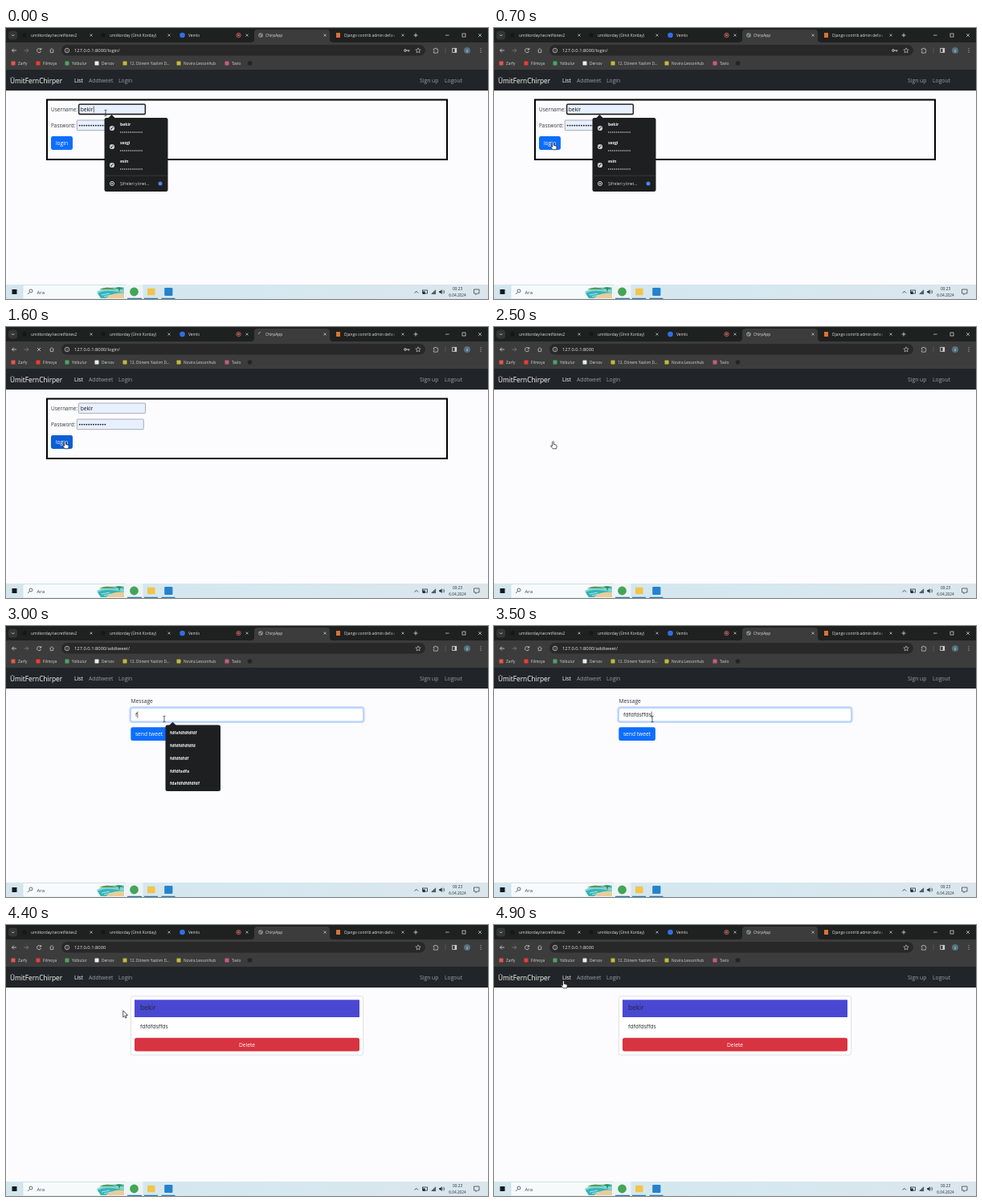
Recreate the animation shown at these times as an HTML page. Size 600 by 338 pixels, loop 5 s.

```html
<!DOCTYPE html>
<html lang="tr">
<head>
<meta charset="utf-8">
<title>ChirpApp</title>
<style>
html, body { margin: 0; width: 100%; height: 100%; overflow: hidden; background: #fcfbfd; }
svg { display: block; width: 100%; height: 100%; font-family: "Open Sans", "Noto Sans", sans-serif; }
</style>
</head>
<body>
<svg id="stage" viewBox="0 0 600 338" preserveAspectRatio="none"></svg>
<script>
const LOOP = 5000, STEP = 100;
const USER = 'bekir', MESSAGE = 'fdfdfdsffds';
const HISTORY = ['fdfafdfdfdfdf', 'fdfdfdfdfdfd', 'fdfdfdfdf', 'fdfdfadfa', 'fdafdfdfdfdfdf'];

// Drawing helpers return SVG markup.
const rect = (x, y, w, h, fill, more = '') =>
  `<rect x="${x}" y="${y}" width="${w}" height="${h}" fill="${fill}" ${more}/>`;
const dot = (x, y, r, fill, more = '') =>
  `<circle cx="${x}" cy="${y}" r="${r}" fill="${fill}" ${more}/>`;
const text = (x, y, str, size, fill, more = '') =>
  `<text x="${x}" y="${y}" font-size="${size}" fill="${fill}" ${more}>${str}</text>`;
const line = (d, color, width = 0.8, more = '') =>
  `<path d="${d}" fill="none" stroke="${color}" stroke-width="${width}" ${more}/>`;
const shape = (d, fill, more = '') => `<path d="${d}" fill="${fill}" ${more}/>`;
const group = (id, ...parts) => `<g id="${id}">${parts.join('')}</g>`;
const cross = (x, y, r, color, w = 0.8) =>
  line(`M${x - r} ${y - r}l${2 * r} ${2 * r}m0 ${-2 * r}l${-2 * r} ${2 * r}`, color, w);
const bullets = (x, y, gap, r, fill) =>
  Array.from({ length: 12 }, (_, i) => dot(x + i * gap, y, r, fill)).join('');
const globe = (x, y, r, color) =>
  dot(x, y, r, color) +
  shape(`M${x - r * 0.7} ${y - r * 0.2}l${r * 0.8} ${r * 0.3}l${-r * 0.3} ${r * 0.6}zM${x + r * 0.1} ${y - r * 0.7}l${r * 0.6} ${r * 0.5}l${-r * 0.5} ${r * 0.2}z`, '#333');

function tabStrip() {
  const ink = '#dfe1e3';
  const tabs = [
    [31, 'umitkorday/secretNotes2', 106],
    [129, 'umitkorday (Ümit Korday)', 203],
    [227, 'Vemlo', 300],
    [323, 'ChirpApp', 397],
    [421, 'Django contrib admin defau', 494]
  ];
  return rect(0, 0, 600, 19, '#1f2020') +
    shape('M305 18Q309 18 309 14V6Q309 2 313 2H399Q403 2 403 6V14Q403 18 407 18Z', '#3c3c3c') +
    rect(3, 3.5, 11, 11, '#343535', 'rx="3.5"') +
    line('M7 8.3l1.7 1.7l1.7-1.7', ink) +
    dot(23, 9, 2.7, '#151718') + dot(121, 9, 2.7, '#151718') + dot(219.5, 9, 3.3, '#2f6fe8') +
    rect(411, 6, 5, 6, '#d9742f') +
    tabs.map(([x, s, close]) => text(x, 10.9, s, 4.85, ink) + cross(close, 9, 1.5, '#d0d2d4', 0.7)).join('') +
    rect(476, 3, 12, 12, 'url(#fade)') +
    dot(289.5, 9, 2.7, 'none', 'stroke="#c9877f" stroke-width=".7"') + dot(289.5, 9, 1.4, '#e2574c') +
    line('M507.5 9h5m-2.5-2.5v5', ink) +
    line('M547 9h4.5', ink, 0.7) +
    rect(568, 7, 4, 4, 'none', `stroke="${ink}" stroke-width=".7"`) + cross(590, 9, 2, ink, 0.7);
}

function toolbar() {
  const ink = '#d3d5d7';
  const marks = [
    [9, '#e2574c', 15, 'Zarfy'],
    [40, '#f03a32', 46, 'Filmoya'],
    [76, '#4aa563', 82, 'Yolbulur'],
    [113, '#e9eef2', 119, 'Dersov'],
    [148, '#c3b93a', 154, '12. Dönem Yazılım D...'],
    [215, '#c3b93a', 221, 'Novira Lessonhub'],
    [275, '#c75a86', 281, 'Tavlo']
  ];
  return rect(0, 18, 600, 34.3, '#3c3c3c') +
    rect(69, 21, 453, 13.5, '#282828', 'rx="6.7"') +
    line('M13 28H7.5m2.4-2.4L7.5 28l2.4 2.4', ink) +
    line('M22.5 28H28m-2.4-2.4L28 28l-2.4 2.4', '#7c7e80') +
    line('M54.5 28l2.5-2.4l2.5 2.4m-4.2-.6v3.2h3.4v-3.2', ink, 0.7) +
    dot(76, 28, 2.8, 'none', `stroke="${ink}" stroke-width=".7"`) +
    line('M76 27.6v2m0-3.4v.8', ink, 0.7) +
    group('reload', line('M43.4 26.8A2.6 2.6 0 1 0 43.6 29M43.7 25v2.1h-2.2', ink)) +
    group('stop', cross(41, 28, 2, ink)) +
    group('savedKey', dot(497, 28, 1.3, 'none', `stroke="${ink}" stroke-width=".9"`) +
      line('M498.3 28h4.2m-1.2 0v1.6', ink, 0.9)) +
    shape('M513 24.8l.9 2.1l2.3.2l-1.8 1.5l.6 2.3l-2-1.2l-2 1.2l.6-2.3l-1.8-1.5l2.3-.2z', 'none', `stroke="${ink}" stroke-width=".6"`) +
    shape('M532.4 26h1.6q.8-2.3 1.6 0h1.7v1.7q2 .6 0 1.5v1.9h-4.9v-1.8q1.5-.7 0-1.6z', 'none', `stroke="${ink}" stroke-width=".7"`) +
    line('M547 24v8', '#66686a', 0.5) +
    rect(555.7, 25.3, 5, 5.2, 'none', `stroke="${ink}" stroke-width=".8"`) + rect(558.6, 25.3, 2.2, 5.2, ink) +
    dot(574, 28, 4, '#52717d') + text(574, 29.7, 'ü', 4.4, '#e0e6e8', 'text-anchor="middle"') +
    [25.7, 28, 30.3].map(y => dot(591, y, 0.55, ink)).join('') +
    marks.map(([ix, c, x, s]) => rect(ix - 2.5, 41.5, 5, 5, c, 'rx=".4"') + text(x, 45.8, s, 4.8, ink)).join('') +
    dot(303.5, 44, 2.8, '#222426') +
    text(85, 30.1, '', 5.8, '#e4e5e6', 'id="url"') +
    group('favicon', globe(317, 9, 2.8, '#8d9194')) +
    group('spinner', line('M317 6.4A2.6 2.6 0 0 0 314.4 9', '#aeb4b9', 0.8));
}

function navbar() {
  return rect(0, 52, 600, 26, '#212529') +
    text(5, 68.8, 'ÜmitFernChirper', 8.3, '#fff') +
    text(85, 68, 'List', 6.8, '#fff') +
    [[103, 'Addtweet'], [140, 'Login'], [515, 'Sign up'], [546, 'Logout']]
      .map(([x, s]) => text(x, 68, s, 6.8, '#9b9d9f')).join('');
}

function taskbar() {
  const ink = '#25313a';
  return rect(0, 320, 600, 18, 'url(#bar)') +
    rect(7.5, 326, 6, 6, '#14191c') +
    rect(21, 320.5, 128, 17.5, '#f6fafb', 'stroke="#c3d0d6" stroke-width=".5"') +
    dot(31, 328, 2, 'none', `stroke="${ink}" stroke-width=".7"`) + line('M29.5 329.6l-2.4 2.5', ink, 0.7) +
    text(38.5, 331.5, 'Ara', 6, '#353d42') +
    shape('M113 329Q124 322 147 323V337H118Z', '#7fd4d6') +
    shape('M114 331Q125 325 147 331L146 337H118Z', '#35b3b9') +
    shape('M124 337Q134 329 147 331V337Z', '#e7cd9a') +
    shape('M116 326Q126 321 138 326Z', '#5a9a57') +
    shape('M136 325q5-4 11 1l-5-.5l-1 5l-.8-5z', '#2f8a4b') +
    line('M119 333l10-2m-7 4l9-2', '#d9f3f2', 0.8) +
    rect(149, 320, 21.5, 18, '#edf4f6') +
    dot(159.5, 329, 5.4, '#45a557') +
    rect(176, 324.8, 9.5, 8.5, '#f3c44a', 'rx=".6"') +
    rect(197.2, 324, 10.2, 10, '#2582cc', 'rx="1"') +
    [[151, 18], [172, 17], [193.5, 17]].map(([x, w]) => rect(x, 336.8, w, 1.2, '#2878b4')).join('') +
    line('M508.5 330.6l2.3-2.3l2.3 2.3', ink) +
    rect(518.5, 327, 6, 4, 'none', `stroke="${ink}" stroke-width=".8"`) + rect(519, 328.5, 2.7, 3.5, ink) +
    shape('M529 332l5.6-5.5v5.5z', '#66747c') + line('M531 332.2v-2m1.8 2v-3.7m1.8 3.7v-5.5', ink, 0.7) +
    shape('M539.2 328h1.4l2-1.7v5.6l-2-1.7h-1.4z', ink) +
    line('M543.6 327.7q1.1 1.4 0 2.8m1.2-3.8q2 2.4 0 4.8', ink, 0.6) +
    text(562, 327.3, '00:23', 4.8, ink, 'text-anchor="middle"') +
    text(562, 334.9, '6.04.2024', 4.7, ink, 'text-anchor="middle"') +
    shape('M582.5 326h6.5v5h-2.4l-1.6 1.6v-1.6h-2.5z', 'none', `stroke="${ink}" stroke-width=".7"`);
}

function loginPage() {
  const field = 'rx="1" stroke="#777c83" stroke-width=".6"';
  const names = [USER, 'sezgi', 'esin'].map((name, i) => {
    const y = 122 + i * 23;
    return globe(132, y + 3, 3.1, '#d4d6d8') +
      text(142, y + 0.4, name, 5.1, '#f1f1f1', 'font-weight="700"') +
      bullets(142.7, y + 8, 2.4, 0.75, '#d8d8d8');
  }).join('');
  return group('login',
    rect(51, 89.5, 498, 74.5, 'none', 'stroke="#000" stroke-width="2"'),
    text(56, 103.6, 'Username:', 6.5, '#33383d'),
    text(56, 124, 'Password:', 6.4, '#33383d'),
    rect(90.5, 95, 83, 12.7, '#e8f0fe', field),
    rect(88.3, 115, 83, 12.7, '#e8f0fe', field),
    group('userFocus', rect(90.7, 95.2, 82.6, 12.3, 'none', 'rx="1.2" stroke="#111" stroke-width="1.3"')),
    text(92.7, 103.6, USER, 6.6, '#111'),
    group('userCaret', line('M109.3 97.5v7.8', '#111', 0.6)),
    bullets(91.7, 121.6, 2.88, 0.95, '#151515'),
    rect(56, 135, 27, 17, '#0d6efd', 'rx="2.4" id="loginButton"'),
    text(69.5, 145.7, 'login', 6.7, '#fff', 'text-anchor="middle"'),
    group('accounts',
      shape('M127 112.4l4.5-4.4l4.5 4.4z', '#1e1f20'),
      rect(122.5, 112, 79, 92, '#1e1f20', 'rx="2.5"'),
      names,
      line('M122.5 184.2h79', '#4b4c4e', 0.6),
      dot(132, 194, 2.5, 'none', 'stroke="#d4d6d8" stroke-width="1"') + dot(132, 194, 1, '#d4d6d8'),
      text(142, 195.8, 'Şifreleri yönet...', 5, '#d5d5d5'),
      dot(192, 194, 2.5, '#4a86e8')));
}

function composePage() {
  return group('compose',
    text(155.5, 96, 'Message', 6.7, '#33383d'),
    group('ring', rect(154.2, 101.2, 291.6, 18.9, 'none', 'rx="3.2" stroke="#c3dafe" stroke-width="1.8"')),
    rect(155.3, 102.3, 289.4, 16.7, '#fff', 'rx="2.4" stroke="#86b7fe" stroke-width=".7" id="field"'),
    text(161, 113, '', 6.8, '#212529', 'id="typed"'),
    group('caret', line('M0 106.6v8', '#111', 0.6)),
    rect(155.3, 126.3, 45.6, 16.8, '#0d6efd', 'rx="2.4" id="sendButton"'),
    text(178, 137, 'send tweet', 6.65, '#fff', 'text-anchor="middle"'),
    group('history',
      shape('M203 124l4.5-4.3l4.5 4.3z', '#1e1f20'),
      rect(198.5, 123.5, 68.5, 82.5, '#1e1f20', 'rx="2.5" id="historyBox"'),
      HISTORY.map((_, i) => text(204, 135 + i * 15.85, '', 5.2, '#f1f1f1', 'font-weight="700" class="entry"')).join('')));
}

function card() {
  return group('card',
    rect(155.4, 88.8, 289.2, 73.3, '#fff', 'rx="2.6" stroke="#d3d3d8" stroke-width=".7"'),
    rect(160, 93.3, 280, 21.7, '#4a48d3'),
    text(167, 105.9, USER, 8.3, '#212529', 'font-weight="500"'),
    text(167, 129, MESSAGE, 6.8, '#212529'),
    rect(160, 140.8, 280, 16.8, '#d73341', 'rx="2.4"'),
    text(300, 151.5, 'Delete', 6.65, '#fff', 'text-anchor="middle"'));
}

function cursors() {
  const edge = 'stroke="#111" stroke-width=".7" stroke-linejoin="round"';
  return group('cursor',
    group('beam', line('M-1.6-3.8q1.6 0 1.6 1v5.6q0 1-1.6 1m3.2-7.6q-1.6 0-1.6 1m0 5.6q0 1 1.6 1', '#222', 0.7)),
    group('arrow', shape('M0 0V8.2L1.9 6.5L3.1 9.3L4.4 8.7L3.2 6H5.8Z', '#fff', edge)),
    group('hand', shape('M-.9.8Q0-.6.9.8V3.9L3.7 4.6Q4.9 5 4.7 6.4L4.1 9.3H-.3L-2.9 6.2Q-3.2 4.7-.9 5.9Z', '#fff', edge)));
}

const stage = document.getElementById('stage');
stage.innerHTML =
  `<defs><linearGradient id="fade"><stop stop-color="#1f2020" stop-opacity="0"/><stop offset="1" stop-color="#1f2020"/></linearGradient>
  <linearGradient id="bar"><stop stop-color="#d3e6ee"/><stop offset=".5" stop-color="#d5e8f0"/><stop offset="1" stop-color="#dbe6ec"/></linearGradient></defs>` +
  rect(0, 0, 600, 338, '#fcfbfd') + tabStrip() + toolbar() + navbar() +
  loginPage() + composePage() + card() + taskbar() + cursors();

const el = Object.fromEntries([...stage.querySelectorAll('[id]')].map(n => [n.id, n]));
const entries = [...stage.querySelectorAll('.entry')];
const show = (id, on) => { el[id].style.display = on ? '' : 'none'; };

// Pointer path: time, look, x, y.
const PATH = [
  [0, 'beam', 124, 106], [200, 'beam', 122, 105], [300, 'arrow', 112, 113], [600, 'hand', 73.5, 142.5],
  [2500, 'hand', 73.5, 142.5], [2600, 'arrow', 92, 108], [2700, 'hand', 117, 65], [2800, 'hand', 117, 65],
  [2900, 'beam', 197, 116], [3500, 'beam', 197, 116], [3700, 'hand', 180.5, 129], [4200, 'hand', 180.5, 129],
  [4300, 'arrow', 165, 119], [4700, 'hand', 88, 70], [4900, 'hand', 86.5, 69.5]
];

function pointer(t) {
  const i = PATH.findLastIndex(k => k[0] <= t);
  const [t0, look, x0, y0] = PATH[i];
  const [t1, , x1, y1] = PATH[i + 1] || [LOOP, look, x0, y0];
  const p = (t - t0) / (t1 - t0);
  return [look, x0 + (x1 - x0) * p, y0 + (y1 - y0) * p];
}

function render(t) {
  const within = (a, b) => t >= a && t < b;
  const composing = within(2800, 4100);
  const onLogin = t < 2000;
  const loading = within(1400, 2000) || within(4000, 4100);

  show('login', onLogin);
  show('compose', composing);
  show('card', t >= 4100);
  show('savedKey', onLogin);
  show('accounts', t < 1200);
  show('userFocus', t < 1200);
  show('userCaret', t < 300);
  for (const id of ['stop', 'spinner']) show(id, loading);
  for (const id of ['reload', 'favicon']) show(id, !loading);
  el.url.textContent = '127.0.0.1:8000' + (onLogin ? '/login/' : composing ? '/addtweet/' : '');
  el.loginButton.setAttribute('fill', t < 1200 ? '#0d6efd' : '#0b5ed7');
  el.sendButton.setAttribute('fill', t < 3700 ? '#0d6efd' : '#0b5ed7');

  // Two more letters per step; suggestions narrow to the typed prefix.
  const typed = t < 3000 ? '' : MESSAGE.slice(0, 1 + 2 * Math.floor((t - 3000) / STEP));
  const focused = within(2900, 4000);
  const found = typed ? HISTORY.filter(s => s.startsWith(typed)) : [];
  el.typed.textContent = typed;
  show('ring', focused);
  el.field.setAttribute('stroke', focused ? '#86b7fe' : '#d3d7dc');
  show('caret', focused);
  if (composing) {
    const x = 161.5 + (typed ? el.typed.getComputedTextLength() : 0);
    el.caret.setAttribute('transform', `translate(${x})`);
  }
  show('history', found.length > 0);
  el.historyBox.setAttribute('height', 3.25 + 15.85 * found.length);
  entries.forEach((n, i) => { n.textContent = found[i] || ''; });

  const [look, x, y] = pointer(t);
  el.cursor.setAttribute('transform', `translate(${x} ${y})`);
  for (const id of ['beam', 'arrow', 'hand']) show(id, id === look);
}

const start = performance.now();
function tick() {
  const t = (performance.now() - start) % LOOP;
  render(Math.floor(t / STEP) * STEP);
  requestAnimationFrame(tick);
}
tick();
</script>
</body>
</html>
```
